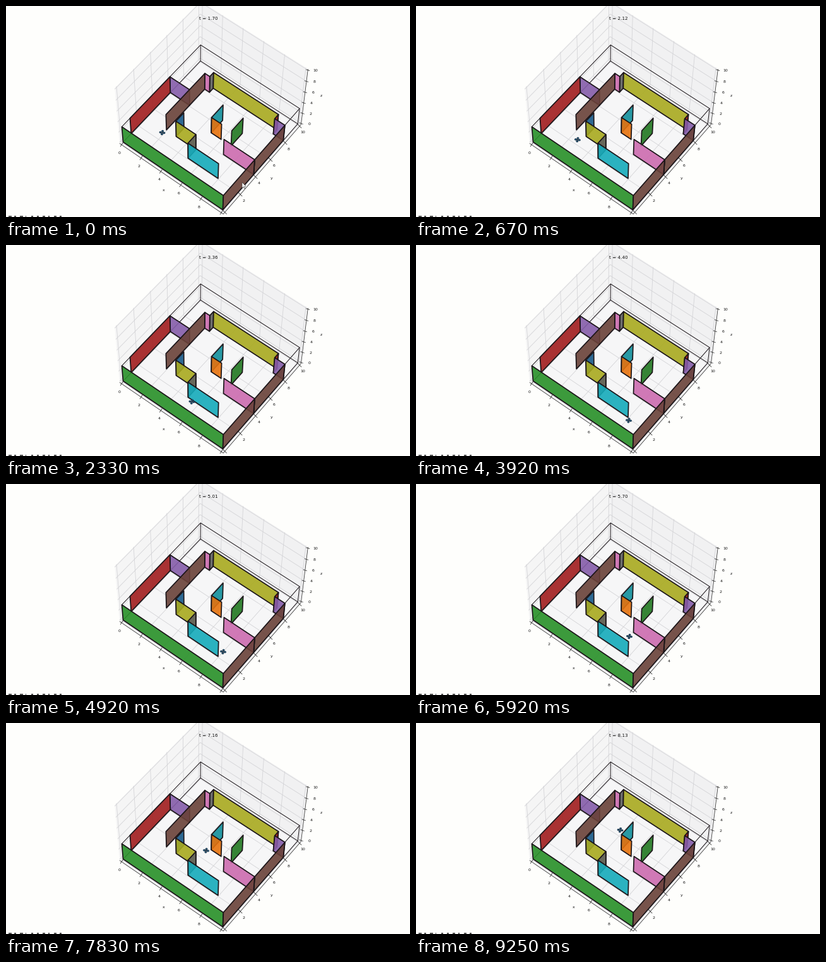
Write a matplotlib script that moves like this. It is 640 px wide and 335 px high and loops after 9330 ms.

```python
import numpy as np
import matplotlib.pyplot as plt
from matplotlib.animation import FuncAnimation
from matplotlib.collections import LineCollection
from matplotlib.colors import to_rgb
from matplotlib.patches import Ellipse, Polygon

W, H, DPI = 640, 335, 80
TICK_MS, LOOP_MS = 30, 9330
STEP_MS = 1000 / 12  # the picture itself changes 12 times a second
PT = 72 / DPI        # points per pixel
LO, HI = -0.2, 10.2  # limits of the axes box
WALL = 3             # wall height
INK = "#1a1418"

fig = plt.figure(figsize=(W / DPI, H / DPI), dpi=DPI, facecolor="#fefefc")
ax = fig.add_axes([0, 0, 1, 1])
ax.set_xlim(0, W)
ax.set_ylim(H, 0)
ax.axis("off")


def fit_camera(anchors):
    """Projection matrix from pairs of space point and pixel."""
    rows, rhs = [], []
    for point, (u, v) in anchors:
        p = np.append(point, 1.0)
        rows.append([*p, 0, 0, 0, 0, *(-u * p[:3])])
        rows.append([0, 0, 0, 0, *p, *(-v * p[:3])])
        rhs += [u, v]
    solution = np.linalg.lstsq(np.array(rows), np.array(rhs), rcond=None)[0]
    return np.append(solution, 1).reshape(3, 4)


CAMERA = fit_camera([
    ((0, 0, 0), (186, 217)), ((10, 0, 0), (344, 325)),
    ((10, 10, 0), (462, 187)), ((0, 10, 0), (308, 87)),
    ((0, 0, WALL), (183.5, 191)), ((10, 0, WALL), (343.5, 299.5)),
    ((10, 10, WALL), (465, 162)), ((0, 10, WALL), (308, 62)),
    ((LO, LO, HI), (172, 130)), ((HI, HI, HI), (479, 101)),
])


def project(x, y, z):
    u, v, w = CAMERA @ (x, y, z, 1)
    return np.array([u / w, v / w])


def shape(points, fill, edge="none", width=0.0, z=1.0):
    patch = Polygon(points, closed=True, facecolor=fill, edgecolor=edge,
                    linewidth=width * PT, joinstyle="round", zorder=z)
    return ax.add_patch(patch)


def lines(paths, color=INK, width=1.0, z=2.0):
    group = LineCollection(paths, colors=color, linewidths=width * PT,
                           zorder=z)
    return ax.add_collection(group, autolim=False)


def label(x, y, text, size=6.2, ha="center"):
    return ax.text(x, y, text, fontsize=size * PT, color="#111111", ha=ha,
                   va="center", family="DejaVu Sans", zorder=9)


def draw_axes():
    square = [(LO, LO), (LO, HI), (HI, HI), (HI, LO)]
    shape([project(LO, a, b) for a, b in square], "#f5f5f5")
    shape([project(a, HI, b) for a, b in square], "#f1f1f2")
    shape([project(a, b, LO) for a, b in square], "#f6f6f7")

    grid = []
    for k in range(0, 11, 2):
        for path in ([(k, LO, LO), (k, HI, LO), (k, HI, HI)],
                     [(HI, k, LO), (LO, k, LO), (LO, k, HI)],
                     [(LO, LO, k), (LO, HI, k), (HI, HI, k)]):
            grid.append([project(*p) for p in path])
    lines(grid, "#d3d3d6", 0.8, 1.2)

    rim = [(LO, LO, LO), (HI, LO, LO), (HI, HI, LO), (HI, HI, HI)]
    lines([[project(*p) for p in rim]], "#333333", 0.8, 1.5)

    ticks = []
    for k in range(0, 11, 2):
        for point, out, offset in (((k, LO, LO), (-2, 3), (-3, 13)),
                                   ((HI, k, LO), (3, 3), (5.5, 10)),
                                   ((HI, HI, k), (3, 1), (12.5, 1))):
            at = project(*point)
            ticks.append([at - out, at + out])
            x, y = at + offset
            if y < H - 5:
                label(x, y, str(k))
    lines(ticks, "#333333", 0.8)
    for x, y, name in ((250, 292, "x"), (421, 274, "y"), (499, 142, "z")):
        label(x, y, name)


def draw_open_frame():
    """Outline of the outer walls that have no fill."""
    for path in ([(10, 8), (10, 10), (0, 10), (0, 6)], [(0, 0), (0, 1)]):
        lines([[project(x, y, z) for x, y in path] for z in (0, WALL)])
    lines([[project(x, 10, 0), project(x, 10, WALL)] for x in (0, 10)])


def draw_walls():
    # Floor plan: start, end, colour
    plan = [
        ((0, 0), (10, 0), "green"), ((10, 0), (10, 4), "brown"),
        ((10, 4), (10, 8), "brown"), ((9, 8), (10, 8), "purple"),
        ((9, 8), (9, 8.5), "red"), ((2.5, 8.5), (9, 8.5), "olive"),
        ((2.5, 8), (2.5, 8.5), "gray"), ((2, 8), (2.5, 8), "pink"),
        ((2, 3), (2, 8), "brown"), ((0, 6), (2, 6), "purple"),
        ((0, 1), (0, 6), "red"), ((3, 3), (3, 4), "blue"),
        ((3, 3), (5, 3), "olive"), ((5, 2), (5, 3), "gray"),
        ((5, 2), (8, 2), "cyan"), ((5, 5), (6, 5), "orange"),
        ((5, 5), (5, 6.5), "cyan"), ((7, 5), (7, 6.5), "green"),
        ((7, 4), (10, 4), "pink"),
    ]
    # Far walls first
    plan.sort(key=lambda w: w[0][0] + w[1][0] - w[0][1] - w[1][1])
    for i, (a, b, hue) in enumerate(plan):
        shade = 0.75 if a[0] == b[0] else 0.9
        fill = (*np.multiply(to_rgb("tab:" + hue), shade), 0.9)
        corners = [project(*a, WALL), project(*b, WALL),
                   project(*b, 0), project(*a, 0)]
        shape(corners, fill, INK, 1.7, 3 + i * 0.01)


def draw_toolbar_edge():
    rng = np.random.default_rng(4)
    lines([[(x, 334), (x + rng.uniform(1, 5), 334)]
           for x in range(4, 90, 9)], "#1c1c1c", 1.5)


def spline(times, values):
    """Natural cubic spline as a function of time."""
    times, values = np.array(times, float), np.array(values, float)
    count = len(times)
    line_part = np.column_stack([np.ones(count), times])
    system = np.zeros((count + 2, count + 2))
    system[:count, :count] = abs(times[:, None] - times) ** 3
    system[:count, count:] = line_part
    system[count:, :count] = line_part.T
    rhs = np.vstack([values, np.zeros((2, values.shape[1]))])
    weights = np.linalg.solve(system, rhs)
    return lambda t: np.append(abs(t - times) ** 3, [1, t]) @ weights


draw_axes()
draw_open_frame()
draw_walls()
draw_toolbar_edge()

# Step -> drone x, drone y, clock
flight = spline([0, 17, 28, 47, 71, 94, 111], [
    (247.5, 201, 1.70), (270, 227.5, 2.66), (297, 251, 3.43),
    (337, 278.5, 4.40), (338, 242, 5.70), (317, 202.5, 7.16),
    (323.5, 170, 8.13)])

clock = label(305.5, 20, "", 7.2, ha="left")
pointer = shape([(374, 280), (374, 289), (376, 287), (378, 290),
                 (379, 289), (377.5, 286.5), (380, 286)],
                "white", "#333333", 0.5, 8)
rotors = [ax.add_patch(Ellipse((0, 0), 2.9, 2.4, facecolor="#3a86b4",
                               edgecolor="#10283c", linewidth=0.9 * PT,
                               zorder=6)) for _ in range(4)]
arms = lines([], "#10283c", 1, 6.5)
ANGLES = 0.2 + np.arange(4) * np.pi / 2
TIPS = np.column_stack([3 * np.cos(ANGLES), 2.5 * np.sin(ANGLES)])


def update(tick):
    # Each tick shows the step reached by its later part
    step = int((tick * TICK_MS + 20) / STEP_MS)
    x, y, seconds = flight(step)
    clock.set_text(f"t = {seconds:.2f}")
    pointer.set_visible(step < 7)
    tips = TIPS + (x, y)
    for rotor, tip in zip(rotors, tips):
        rotor.set_center(tip)
    arms.set_segments([tips[0::2], tips[1::2]])
    return [clock, pointer, arms, *rotors]


anim = FuncAnimation(fig, update, frames=LOOP_MS // TICK_MS,
                     interval=TICK_MS, repeat=True, repeat_delay=0,
                     blit=False)
plt.show()
```
